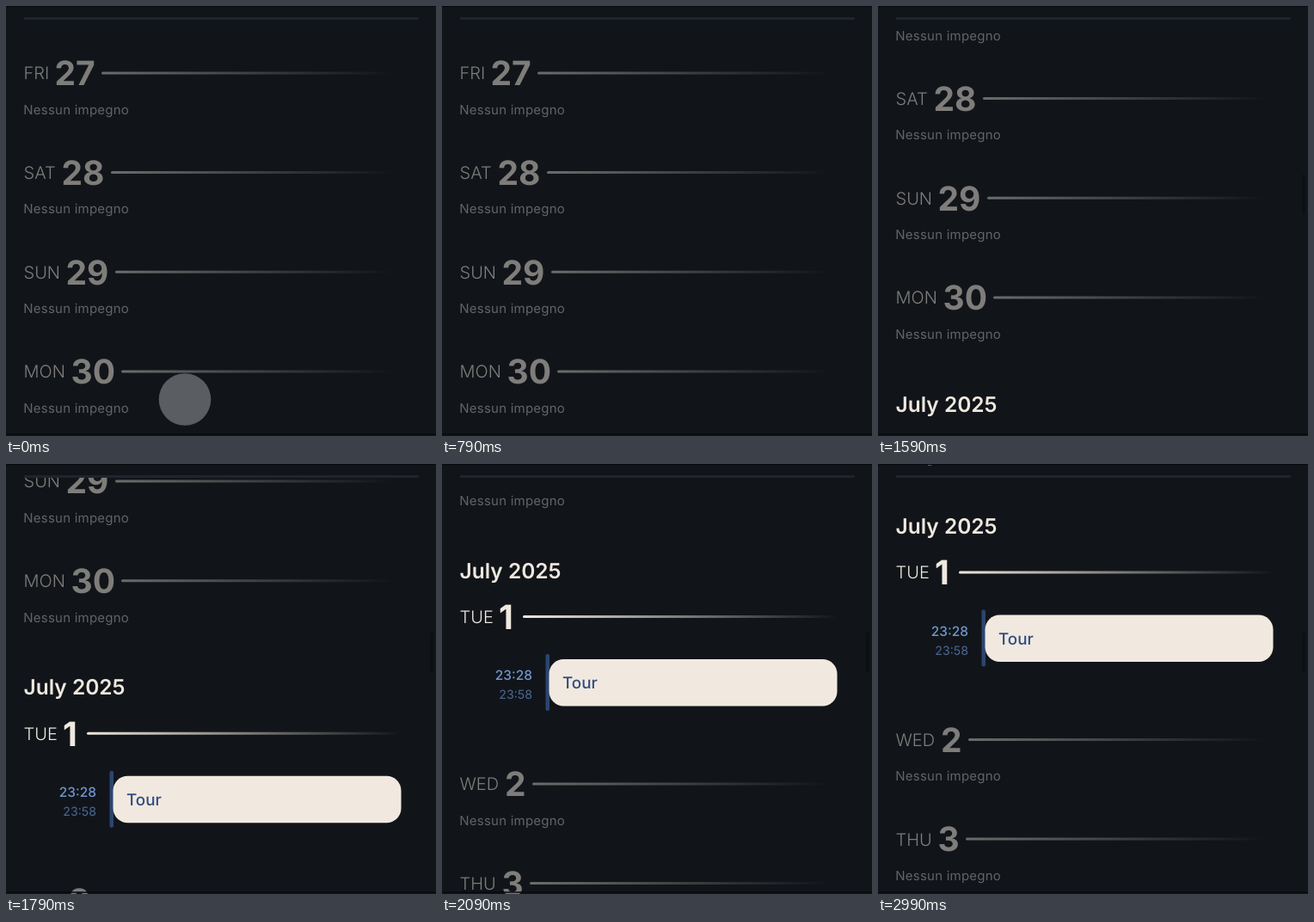
An HTML page for the animation above (3.09 s loop, 500 px wide and 500 px high).

```html
<!DOCTYPE html>
<html lang="it">
<head>
<meta charset="utf-8">
<style>
  html, body { margin: 0; width: 100%; height: 100%; overflow: hidden; background: #11151a; }
  svg { display: block; width: 100vw; height: 100vh; font-family: Inter, sans-serif; text-rendering: geometricPrecision; }
  .name { font-size: 20px; font-weight: 300; }
  .num { font-size: 39px; font-weight: 700; }
  .note { font-size: 15px; letter-spacing: .22px; fill: #626467; }
  .month { font-size: 24.5px; font-weight: 600; fill: #efe8de; }
  .day { fill: #7f7d7a; }
  .day.busy { fill: #f0e9df; }
</style>
</head>
<body>
<svg viewBox="0 0 500 500">
  <defs>
    <linearGradient id="dim">
      <stop stop-color="#6c6c6a"/>
      <stop offset="1" stop-color="#6c6c6a" stop-opacity="0"/>
    </linearGradient>
    <linearGradient id="bright">
      <stop stop-color="#efe7db"/>
      <stop offset="1" stop-color="#efe7db" stop-opacity="0"/>
    </linearGradient>
    <clipPath id="view"><path d="M0 16H500V500H0z"/></clipPath>
  </defs>
  <text id="header" class="month" x="20.5" y="-3.5" opacity=".45"></text>
  <rect x="21" y="13" width="459" height="3" rx="1" fill="#1f252c"/>
  <g clip-path="url(#view)"><g id="list"></g></g>
  <rect id="thumb" x="493" y="196" width="4" height="46" rx="2" fill="#0c0f13"/>
  <circle id="touch" cx="208" cy="457.5" r="30.3" fill="#5a5d62"/>
  <path d="M0 .5H500M0 498H500" stroke="#080a0d" stroke-width="1.5"/>
</svg>
<script>
const LOOP = 3090;
const $ = id => document.getElementById(id);

// name, number, centre y, number x, rule x
const days = [
  ['FRI', 27, 78, 56.5, 111],
  ['SAT', 28, 193.6, 64.5, 122],
  ['SUN', 29, 309.3, 69.5, 127],
  ['MON', 30, 425, 75.5, 134],
  ['TUE', 1, 602.5, 66, 94],
  ['WED', 2, 797, 73, 105],
  ['THU', 3, 912.7, 69.5, 102]
];

const event = `
  <g font-weight="500">
    <text x="105" y="676" text-anchor="end" font-size="15.5" fill="#7296cd">23:28</text>
    <text x="105" y="698" text-anchor="end" font-size="14.2" font-weight="400" fill="#4b6795">23:58</text>
    <rect x="120.5" y="646" width="4.5" height="66" rx="2" fill="#2b4570"/>
    <rect x="124.5" y="652" width="335" height="54.5" rx="17" fill="#f1e9df"/>
    <text x="140" y="686" font-size="18.8" fill="#304b80">Tour</text>
  </g>`;

function dayRow([name, num, y, numX, ruleX]) {
  const busy = num === 1;
  const end = busy ? 460 : 450;
  return `<g class="day ${busy ? 'busy' : ''}">
    <text class="name" x="20.5" y="${y + 7.3}">${name}</text>
    <text class="num" x="${numX}" y="${y + 14.2}">${num}</text>
    <rect x="${ruleX}" y="${y - 1.6}" width="${end - ruleX}" height="3" rx="1.5" fill="url(#${busy ? 'bright' : 'dim'})"/>
    ${busy ? event : `<text class="note" x="20.3" y="${y + 47.8}">Nessun impegno</text>`}
  </g>`;
}

$('list').innerHTML = days.map(dayRow).join('') +
  '<text class="month" x="20.5" y="557.5">July 2025</text>';

// time, offset, speed
const keys = [[1090, 0, 0], [1590, 86, .65], [1890, 366, .42], [2090, 425, .24], [2390, 476.5, 0]];

function scrollAt(t) {
  if (t <= keys[0][0]) return 0;
  const i = keys.findIndex(k => t < k[0]);
  if (i < 0) return keys.at(-1)[1];
  const [t0, p0, v0] = keys[i - 1], [t1, p1, v1] = keys[i];
  const d = t1 - t0, u = (t - t0) / d, w = 1 - u;
  return w * w * ((1 + 2 * u) * p0 + u * d * v0) + u * u * ((3 - 2 * u) * p1 - w * d * v1);
}

function draw(now) {
  const t = now % LOOP;
  // The picture advances in 100 ms steps
  const step = t < 100 ? 0 : Math.floor((t - 90) / 100) * 100 + 90;
  const offset = scrollAt(step);
  $('list').setAttribute('transform', `translate(0 ${-offset})`);
  $('header').textContent = offset > 440 ? 'July 2025' : 'June 2025';
  $('touch').setAttribute('opacity', Math.max(0, 1 - step / 290));
  $('thumb').setAttribute('opacity', offset > 0 ? 1 : 0);
  requestAnimationFrame(draw);
}
requestAnimationFrame(draw);
</script>
</body>
</html>
```
